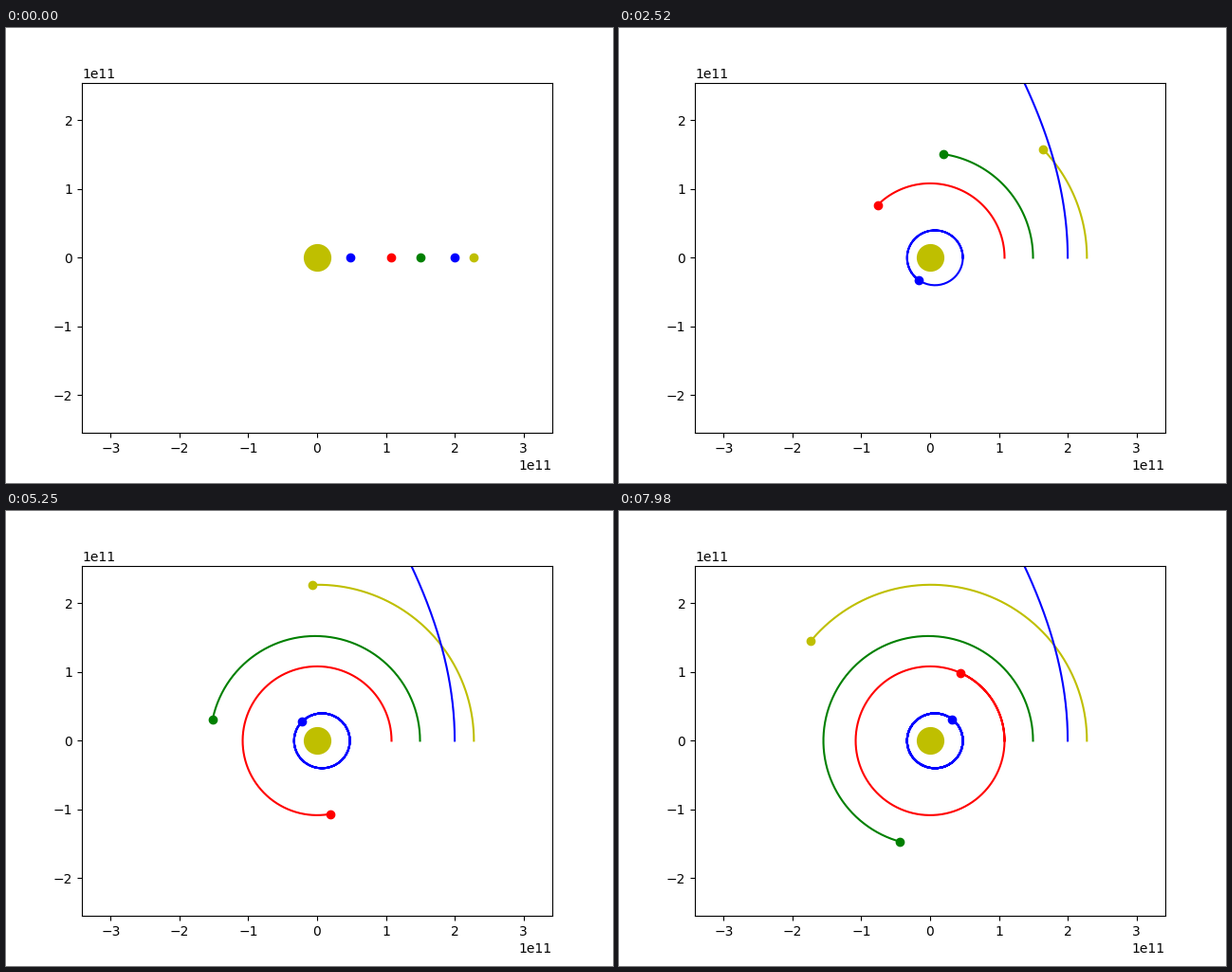
A matplotlib script for the animation above (8 s loop, 640 by 480 pixels).

```python
import numpy as np
import matplotlib.pyplot as plt
from matplotlib.animation import FuncAnimation

GM = 1.32712e20           # gravity of the sun, m^3/s^2
DAY = 86400.0
DAYS = 267                # one simulated day every STEP_MS
STEP_MS = 30
INTERVAL = 20
FRAMES = 400
SUBSTEPS = 24

# start distance (m), tangential speed (m/s), colour
BODIES = [
    (4.76e10, 47975, "b"),
    (1.082e11, 35020, "r"),
    (1.496e11, 30050, "g"),
    (2.279e11, 24077, "y"),
    (2.0e11, 40000, "b"),
]


def pull(pos):
    dist = np.linalg.norm(pos, axis=1, keepdims=True)
    return -GM * pos / dist**3


def simulate():
    """Daily positions of all bodies, shape (days, bodies, 2)."""
    pos = np.array([[r, 0.0] for r, _, _ in BODIES])
    vel = np.array([[0.0, v] for _, v, _ in BODIES])
    dt = DAY / SUBSTEPS
    path = [pos.copy()]
    for _ in range(DAYS - 1):
        for _ in range(SUBSTEPS):
            vel += pull(pos) * dt / 2
            pos += vel * dt
            vel += pull(pos) * dt / 2
        path.append(pos.copy())
    return np.array(path)


path = simulate()

fig, ax = plt.subplots(figsize=(6.4, 4.8), dpi=100)
half = 1.5 * 2.279e11
ax.set_xlim(-half, half)
ax.set_ylim(-half * 369.6 / 496, half * 369.6 / 496)

ax.plot([0], [0], "yo", markersize=20)
trails = [ax.plot([], [], c + "-")[0] for _, _, c in BODIES]
dots = [ax.plot([], [], c + "o")[0] for _, _, c in BODIES]


def update(i):
    day = min((i * INTERVAL + INTERVAL // 2) // STEP_MS, DAYS - 1)
    for k, (trail, dot) in enumerate(zip(trails, dots)):
        trail.set_data(path[:day + 1, k, 0], path[:day + 1, k, 1])
        dot.set_data(path[day:day + 1, k, 0], path[day:day + 1, k, 1])
    return trails + dots


anim = FuncAnimation(fig, update, frames=FRAMES, interval=INTERVAL,
                     init_func=lambda: update(0), repeat=True, repeat_delay=0)
plt.show()
```
